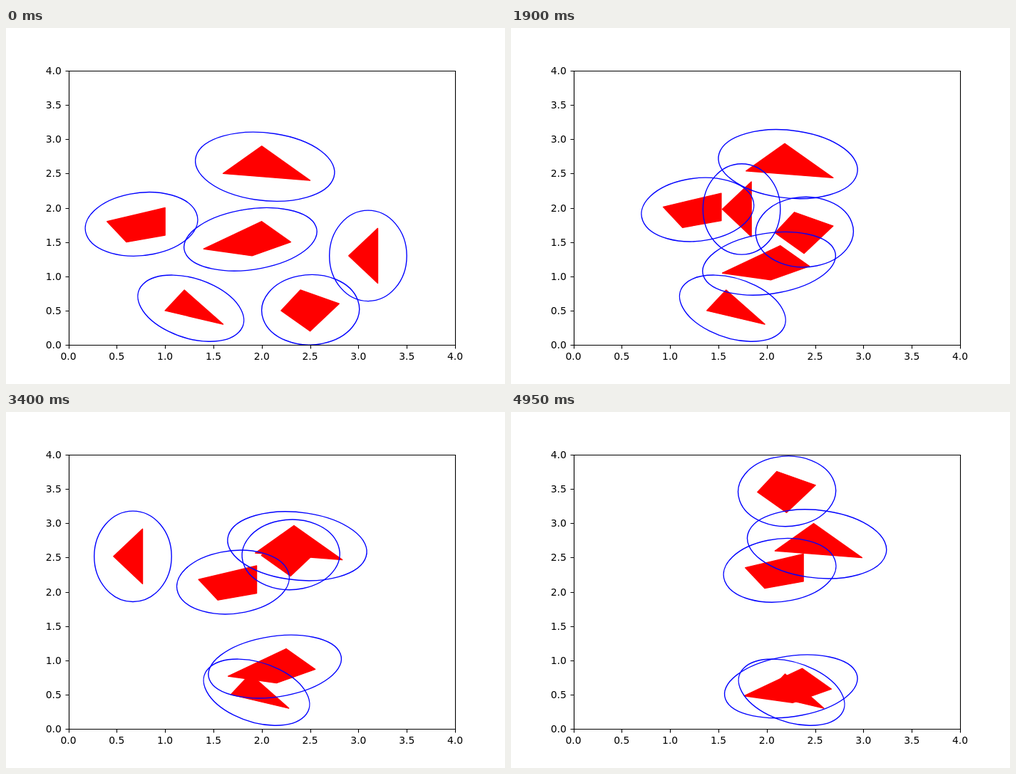
Recreate the animation shown at these times as an HTML page. Size 700 by 500 pixels, loop 5 s.

```html
<!DOCTYPE html>
<html lang="en">
<head>
<meta charset="utf-8">
<title>Moving polygons with bounding ellipses</title>
<style>
  html, body { margin: 0; width: 100%; height: 100%; overflow: hidden; background: #fff; }
  svg { display: block; }
  polygon { fill: #f00; stroke: #f00; stroke-linejoin: round; }
  ellipse { fill: none; stroke: #00f; }
  polygon, ellipse { stroke-width: 1.39px; vector-effect: non-scaling-stroke; }
  #axes path { fill: none; stroke: #000; stroke-width: 1.11px; }
  #axes text { font: 13.89px "DejaVu Sans", sans-serif; fill: #000; }
</style>
</head>
<body>
<svg width="700" height="500" viewBox="0 0 700 500">
  <clipPath id="plot"><rect x="87.5" y="60" width="542.5" height="385"/></clipPath>
  <g clip-path="url(#plot)">
    <g id="data" transform="translate(87.5 445) scale(135.625 -96.25)">
      <g id="fills"></g>
      <g id="rings"></g>
    </g>
  </g>
  <g id="axes"></g>
</svg>
<script>
const STEP = 50, STEPS = 100, MARGIN = 0.2;

// Vertices, heading and speed per step, in plot units.
const shapes = [
  { pts: [[0.4, 1.8], [1, 2], [1, 1.6], [0.6, 1.5]], dir: [5, 2], speed: 0.015 },
  { pts: [[1.4, 1.4], [2, 1.8], [2.3, 1.5], [1.9, 1.3]], dir: [2, -5], speed: 0.01 },
  { pts: [[1, 0.5], [1.2, 0.8], [1.6, 0.3]], dir: [1, 0], speed: 0.01 },
  { pts: [[2.2, 0.5], [2.4, 0.8], [2.8, 0.6], [2.5, 0.2]], dir: [-1, 10], speed: 0.03 },
  { pts: [[2.9, 1.3], [3.2, 1.7], [3.2, 0.9]], dir: [-2, 1], speed: 0.04 },
  { pts: [[1.6, 2.5], [2, 2.9], [2.5, 2.4]], dir: [5, 1], speed: 0.005 }
];

const byId = id => document.getElementById(id);

function add(parent, tag, attrs, text = '') {
  const el = document.createElementNS('http://www.w3.org/2000/svg', tag);
  for (const key in attrs) el.setAttribute(key, attrs[key]);
  el.textContent = text;
  return parent.appendChild(el);
}

// Smallest ellipse around the points, found by reweighting them, then widened.
function boundingEllipse(pts) {
  let w = pts.map(() => 1 / pts.length);
  const mean = f => pts.reduce((sum, p, i) => sum + w[i] * f(p), 0);
  let cx, cy, xx, yy, xy;
  for (let i = 0; i < 2000; i++) {
    cx = mean(p => p[0]);
    cy = mean(p => p[1]);
    xx = mean(p => (p[0] - cx) ** 2);
    yy = mean(p => (p[1] - cy) ** 2);
    xy = mean(p => (p[0] - cx) * (p[1] - cy));
    const det = xx * yy - xy * xy;
    w = w.map((wi, k) => {
      const dx = pts[k][0] - cx, dy = pts[k][1] - cy;
      return wi * (1 + (yy * dx * dx - 2 * xy * dx * dy + xx * dy * dy) / det) / 3;
    });
  }
  const mid = (xx + yy) / 2, dev = Math.hypot((xx - yy) / 2, xy);
  const angle = Math.atan2(2 * xy, xx - yy) * 90 / Math.PI;
  return {
    rx: Math.sqrt(2 * (mid + dev)) + MARGIN,
    ry: Math.sqrt(2 * (mid - dev)) + MARGIN,
    transform: `translate(${cx} ${cy}) rotate(${angle})`
  };
}

function drawAxes() {
  const axes = byId('axes');
  let d = 'M88.5 60.5H630.5V445.5H88.5Z';
  for (let i = 0; i <= 8; i++) {
    const label = (i / 2).toFixed(1);
    const x = 87.5 + 67.8125 * i, y = 445 - 48.125 * i;
    const row = Math.floor(y + 0.5);
    d += `M${Math.floor(x + 0.5) + 0.5} 445.5v5M88.5 ${row + 0.5}h-5`;
    add(axes, 'text', { x, y: 466, 'text-anchor': 'middle' }, label);
    add(axes, 'text', { x: 77.8, y: row + 5, 'text-anchor': 'end' }, label);
  }
  add(axes, 'path', { d });
}

const movers = shapes.map(({ pts, dir, speed }) => {
  const k = speed / Math.hypot(...dir);
  const fill = add(byId('fills'), 'g');
  const ring = add(byId('rings'), 'g');
  add(fill, 'polygon', { points: pts.join(' ') });
  add(ring, 'ellipse', boundingEllipse(pts));
  return { parts: [fill, ring], vx: dir[0] * k, vy: dir[1] * k };
});

function pose(step) {
  for (const { parts, vx, vy } of movers)
    for (const el of parts)
      el.setAttribute('transform', `translate(${vx * step} ${vy * step})`);
}

let start;
function tick(now) {
  start ??= now;
  pose(Math.floor((now - start) / STEP) % STEPS);
  requestAnimationFrame(tick);
}

drawAxes();
pose(0);
requestAnimationFrame(tick);
</script>
</body>
</html>
```
